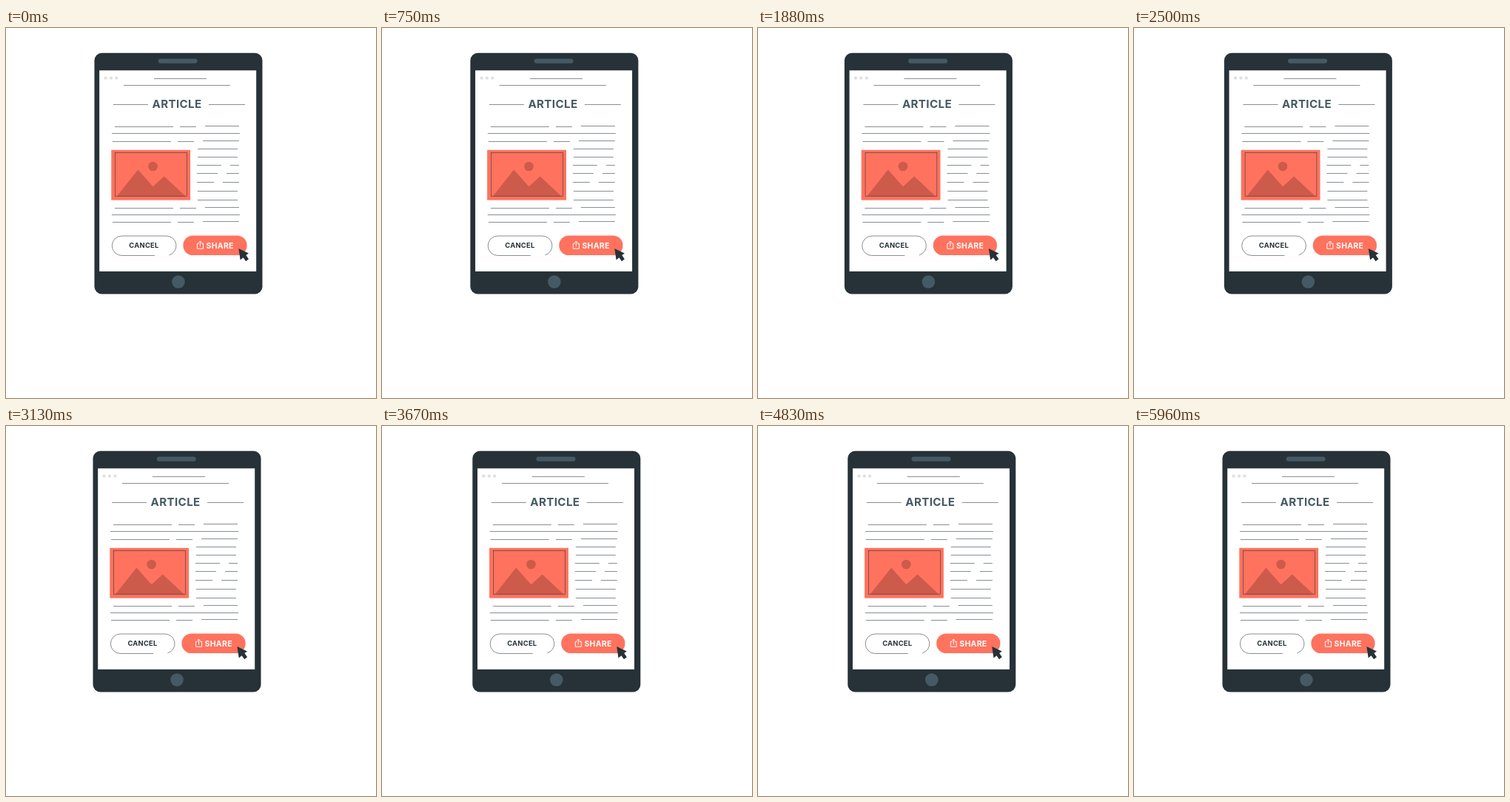
An HTML page for the animation above (6 s loop, 500 px wide and 500 px high).

```html
<!DOCTYPE html>
<html lang="en">
<head>
<meta charset="utf-8">
<title>Article</title>
<style>
  html, body { margin: 0; width: 100%; height: 100%; overflow: hidden; background: #fff; }
  svg { display: block; width: 100%; height: 100%; }
  text { font-family: Inter, "Open Sans", sans-serif; font-weight: 700; text-anchor: middle; letter-spacing: .025em; }
  .thin { fill: none; stroke: #263238; stroke-width: .55; }
</style>
</head>
<body>
<svg viewBox="0 0 500 500">
  <g id="tablet">
    <rect x="119.5" y="33.7" width="227" height="325.8" rx="10" fill="#263238"/>
    <rect x="126.2" y="57.3" width="212" height="271.6" fill="#fff"/>
    <rect x="205.7" y="41.4" width="53" height="6.4" rx="3.2" fill="#455a64"/>
    <circle cx="233" cy="343" r="8.8" fill="#455a64"/>
    <path d="M134.6 67.6h15" stroke="#e0e0e0" stroke-width="4.4" stroke-linecap="round" stroke-dasharray="0 7.4"/>
    <path id="lines" class="thin"/>
    <text x="231.1" y="108.4" font-size="15.1" fill="#455a64">ARTICLE</text>

    <rect x="142.3" y="164.8" width="106.8" height="67.8" fill="#ff725e"/>
    <g fill="#cc5b4b">
      <path d="M150 227.2 178.4 191.5 198.6 214.2 213.8 200.6 242.5 227.2Z"/>
      <circle cx="198.6" cy="187" r="6.3"/>
    </g>
    <rect class="thin" x="147.7" y="168.5" width="96.8" height="58.7"/>

    <path class="thin" d="M201 307.5H156.6a13.2 13.2 0 0 1 0-26.5H216.4a13.2 13.2 0 0 1 4 25.9"/>
    <text x="186.5" y="297.1" font-size="9.4" fill="#263238">CANCEL</text>
    <rect x="239.4" y="280.5" width="86.2" height="26.6" rx="13.2" fill="#ff725e"/>
    <path d="M260.8 291.3H258.5V298.2H266.5V291.3H264.2M262.5 295.3V288.2M260.4 290.2 262.5 288 264.6 290.2"
      fill="none" stroke="#fff"/>
    <text x="289.2" y="297.5" font-size="10.5" fill="#fff">SHARE</text>
    <path d="M314.4 298 328 304.6 324.4 307 328 312.3 324.2 315.2 320.6 310.3 316.7 313.5Z" fill="#263238"/>
  </g>
</svg>
<script>
  const line = (y, from, to) => `M${from} ${y}H${to}`;

  // Three rows: the outer two are broken twice, the middle one is whole
  const paragraph = (top, height) =>
    [[top, 147], [top + height, 144]].map(([y, x]) =>
      line(y, x, x + 79) + line(y, x + 88, x + 110) + line(y - 1, x + 122, 315)
    ).join("") + line(top + 9, 143, 316);

  // Column beside the picture; a gap drifts left through its middle rows
  function column(rows) {
    let d = "";
    for (let i = 0; i < rows; i++) {
      const y = 163.5 + Math.round(i * (10.8 + .11 * i));
      const gap = 301 - 5 * i;
      d += Math.abs(i - 3) < 2
        ? line(y, 258, gap) + line(y, gap + 12, 315)
        : line(y, 259, 313);
    }
    return d;
  }

  document.getElementById("lines").setAttribute("d",
    line(68.5, 200, 271) + line(77.5, 159, 303) +
    line(103.5, 145, 192) + line(103.5, 274, 323) +
    paragraph(133.5, 20) + column(7) + paragraph(243.5, 19));

  const tablet = document.getElementById("tablet");
  const LOOP = 6000, LEAD = 20;
  const start = performance.now();

  // Horizontal shake that runs to its midpoint and mirrors back
  const sway = [0, -1, 2, -4, 4, -4];
  const pose = i => sway[5 - Math.abs(5 - i)];

  function draw(now) {
    const p = (Math.max(0, now - start) + LEAD) % LOOP / LOOP * 10;
    const i = Math.floor(p);
    const shift = pose(i) + (pose(i + 1) - pose(i)) * (p - i);
    tablet.setAttribute("transform", `translate(${shift} 0)`);
    requestAnimationFrame(draw);
  }
  draw(start);
</script>
</body>
</html>
```
